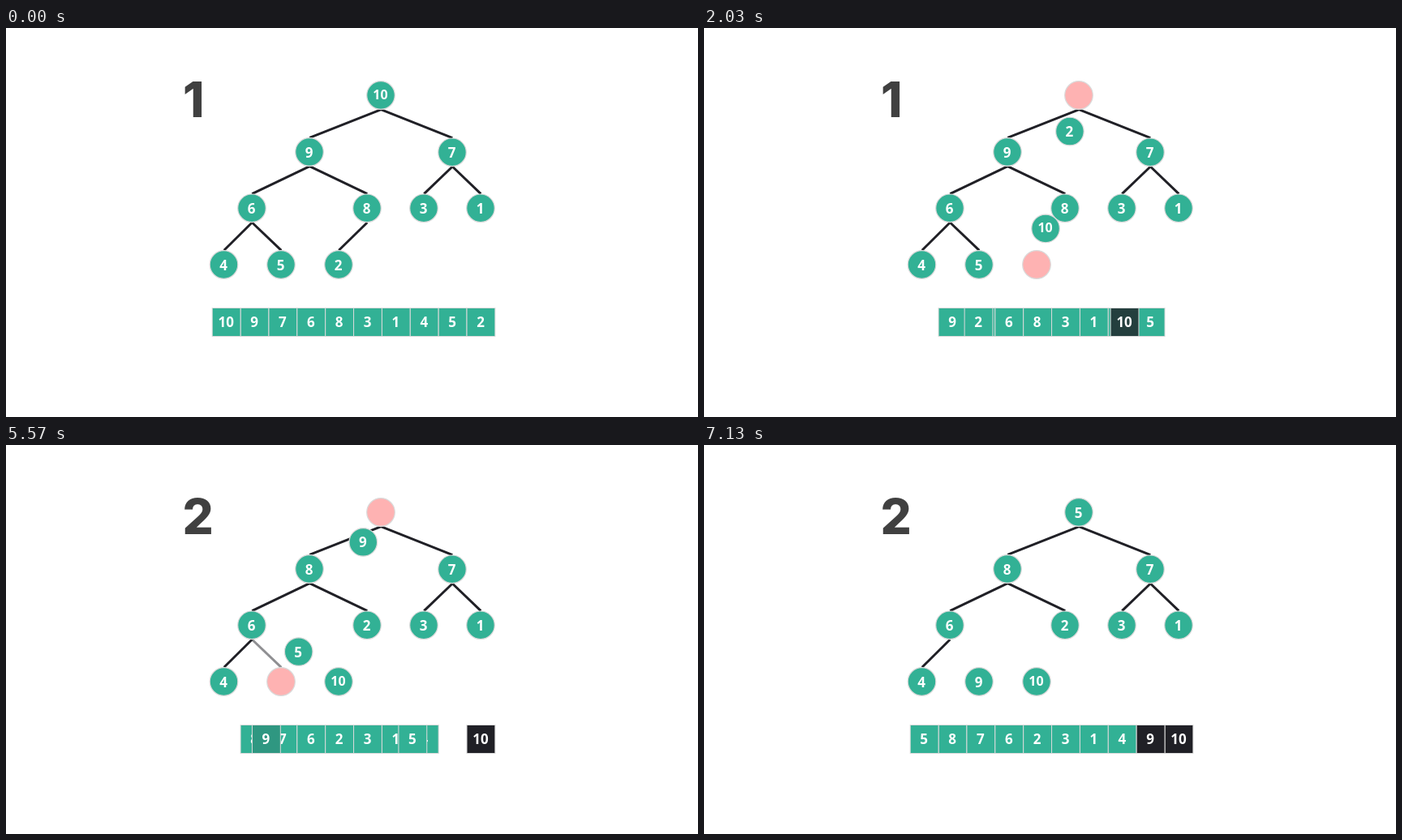
Write an HTML page with a canvas that moves like this. It is 853 by 480 pixels and loops after 8 s.

```html
<!DOCTYPE html>
<html lang="en">
<head>
<meta charset="utf-8">
<title>Heap sort</title>
<style>
html, body { margin: 0; width: 100%; height: 100%; overflow: hidden; background: #fff; }
canvas { display: block; }
</style>
</head>
<body>
<canvas id="stage" width="853" height="480"></canvas>
<script>
const ctx = document.getElementById('stage').getContext('2d');

const LOOP = 8000, STEP = 60, STEPS = 30;
const GREEN = [50, 177, 149], DARK = [32, 32, 38], PINK = [254, 178, 178];
const BORDER = '#dadada', LABEL_FONT = '"Open Sans", "Noto Sans", sans-serif';

// Tree slots in heap order; the children of slot i are 2i + 1 and 2i + 2.
const SLOTS = [
  [462, 83], [374, 153], [550, 153.3], [303, 222.3], [445, 222.3],
  [515, 222.3], [585, 222.3], [268.5, 292], [339, 292], [410, 292]
];

// Each round swaps the root with the slot `last`, then holds until the next.
const ROUNDS = [
  { title: '1', titleX: 218, begin: 0, swap: 1130, last: 9, heap: [10, 9, 7, 6, 8, 3, 1, 4, 5, 2] },
  { title: '2', titleX: 217.5, begin: 4130, swap: 5330, last: 8, heap: [9, 8, 7, 6, 2, 3, 1, 4, 5, 10] }
];

const mix = (a, b, p) => a + (b - a) * p;
const rgb = color => `rgb(${color.map(Math.round)})`;
const blend = (a, b, p) => a.map((v, i) => mix(v, b[i], p));

function ease(t) {
  if (t <= 0 || t >= 1) return t <= 0 ? 0 : 1;
  const bezier = (a, b, s) => 3 * s * (1 - s) ** 2 * a + 3 * s * s * (1 - s) * b + s ** 3;
  let low = 0, high = 1;
  for (let i = 0; i < 24; i++) {
    const mid = (low + high) / 2;
    if (bezier(0.25, 0.33, mid) < t) low = mid; else high = mid;
  }
  return bezier(0.2, 1, low);
}

function label(text, x, baseline, size = 17) {
  ctx.font = `bold ${size}px ${LABEL_FONT}`;
  ctx.textAlign = 'center';
  ctx.fillStyle = '#fff';
  ctx.fillText(text, x, baseline);
}

function drawEdge(child, alpha) {
  const [x1, y1] = SLOTS[(child - 1) >> 1], [x2, y2] = SLOTS[child];
  ctx.globalAlpha = alpha;
  ctx.strokeStyle = rgb(DARK);
  ctx.lineWidth = 3;
  ctx.beginPath();
  ctx.moveTo(x1 + 0.3, y1 + 17.7);
  ctx.lineTo(x2 + 0.3, y2 - 17.7);
  ctx.stroke();
  ctx.globalAlpha = 1;
}

function drawDisc([x, y], color) {
  ctx.beginPath();
  ctx.arc(x, y, 17.3, 0, 2 * Math.PI);
  ctx.fillStyle = rgb(color);
  ctx.fill();
  ctx.strokeStyle = BORDER;
  ctx.lineWidth = 1.2;
  ctx.stroke();
}

function drawNode(value, place) {
  drawDisc(place, GREEN);
  const wide = value > 9;
  label(value, place[0] - 0.5, place[1] + (wide ? 5 : 6.5), wide ? 16 : 17);
}

function drawCell(value, index, color) {
  const x = 254.2 + 34.87 * index;
  ctx.fillStyle = rgb(color);
  ctx.fillRect(x, 345.5, 34.87, 35);
  ctx.strokeStyle = BORDER;
  ctx.lineWidth = 1;
  ctx.strokeRect(x, 345.5, 34.87, 35);
  label(value, x + 17, 369);
}

function draw(time) {
  const round = ROUNDS[time < ROUNDS[1].begin ? 0 : 1];
  const { heap, last } = round;
  const step = Math.min(STEPS, Math.floor((time - round.swap) / STEP));
  const p = ease(step / STEPS);
  const moving = step >= 0;

  ctx.fillStyle = '#fff';
  ctx.fillRect(0, 0, 853, 480);

  ctx.font = '800 60px Inter, "Open Sans", sans-serif';
  ctx.textAlign = 'left';
  ctx.fillStyle = '#404040';
  ctx.fillText(round.title, round.titleX, 110.3);

  for (let i = 1; i < last; i++) drawEdge(i, 1);
  drawEdge(last, Math.max(0, Math.min(1, 1 - step / 8)));

  const swapped = i => i === 0 || i === last;
  heap.forEach((value, i) => {
    if (swapped(i)) {
      if (moving && step < STEPS) drawDisc(SLOTS[i], PINK);
      return;
    }
    drawNode(value, SLOTS[i]);
    drawCell(value, i, i > last ? DARK : GREEN);
  });

  drawNode(heap[last], blend(SLOTS[last], SLOTS[0], p));
  drawNode(heap[0], blend(SLOTS[0], SLOTS[last], p));
  drawCell(heap[last], mix(last, 0, p), GREEN);
  drawCell(heap[0], mix(0, last, p), blend(GREEN, DARK, p));
}

const start = performance.now();
function tick() {
  draw((performance.now() - start) % LOOP);
  requestAnimationFrame(tick);
}
tick();
</script>
</body>
</html>
```
